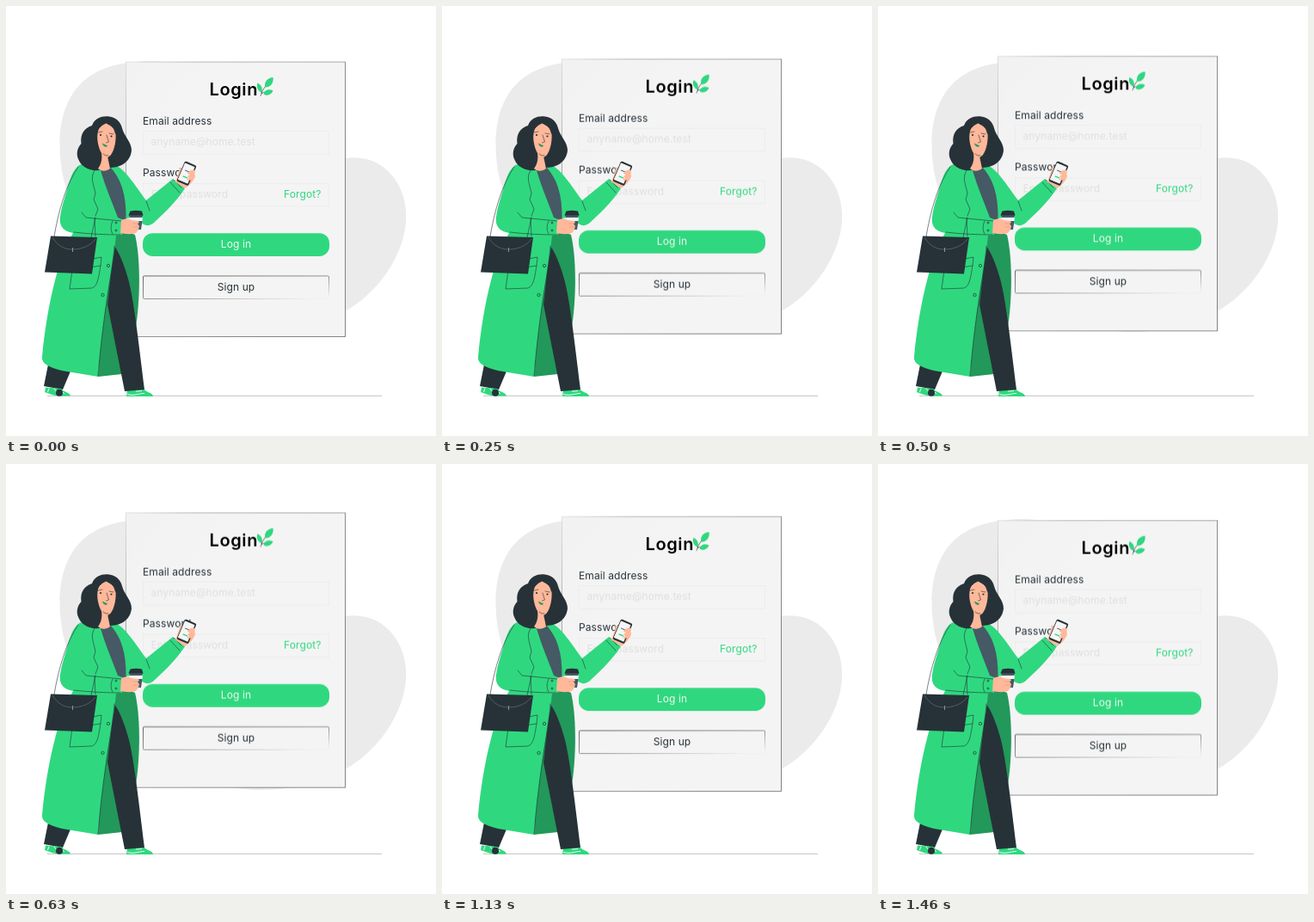
An HTML page that plays this animation: 500x500 px, repeating every 1500 ms.

```html
<!DOCTYPE html>
<html lang="en">
<head>
<meta charset="utf-8">
<title>Login</title>
<style>
  html, body { margin: 0; width: 100%; height: 100%; overflow: hidden; background: #fff; }
  svg { display: block; width: 100%; height: 100%; }
  text { font: 12px Inter, sans-serif; letter-spacing: .1px; fill: #263238; }
  .title { font-size: 20px; font-weight: 600; letter-spacing: .6px; fill: #000; }
  .hint { fill: #e0e0e0; }
  .mid { text-anchor: middle; }
  .green { fill: #2fd87f; }
  .shade { fill: #22985a; }
  .dark { fill: #263238; }
  .slate { fill: #455a64; }
  .skin { fill: #ffb89a; }
  .light { fill: #f5f5f5; }
  .field { fill: none; stroke: #ebebeb; stroke-width: .8; }
  .line { fill: none; stroke: #263238; stroke-width: .6; stroke-linecap: round; stroke-linejoin: round; }
  .panel { animation: float 1.5s steps(18, start) -5ms infinite; }
  @keyframes float {
    50% { transform: translateY(-10px); }
  }
</style>
</head>
<body>
<svg viewBox="0 0 500 500">
  <defs>
    <linearGradient id="edge" gradientUnits="userSpaceOnUse" x1="139" y1="65" x2="395" y2="200">
      <stop offset="0" stop-color="#ddd"/>
      <stop offset=".25" stop-color="#999"/>
      <stop offset="1" stop-color="#777"/>
    </linearGradient>
    <linearGradient id="sheet" x1="0" y1="0" x2="1" y2="1">
      <stop offset="0" stop-color="#f2f2f2"/>
      <stop offset=".3" stop-color="#f4f4f4"/>
    </linearGradient>
    <linearGradient id="outline" x1="0" y1="0" x2="1" y2="1">
      <stop offset="0" stop-color="#444"/>
      <stop offset=".5" stop-color="#777"/>
      <stop offset=".95" stop-color="#f0f0f0"/>
    </linearGradient>
  </defs>

  <!-- backdrop -->
  <path fill="#ebebeb" d="M62.500 160C63 112 84 71 147 65.500C200 58 250 80 290 120C330 165 360 182 400 176.500C440 173.500 466 208 465.300 246C464 290 432 334 395 354.500C362 373 325 380 288 379C230 376 170 345 130 305C92 270 62 220 62.500 160Z"/>
  <path d="M48 453.300H437" stroke="#b0b0b0" stroke-width=".8"/>

  <!-- form -->
  <g class="panel">
    <rect x="139.500" y="65.500" width="255" height="319.600" fill="url(#sheet)" stroke="url(#edge)" stroke-width=".9"/>
    <text class="title" x="236.500" y="105">Login</text>
    <path class="line" d="M296 105Q297 100 302 93M297.500 102L301 100.500M297.500 102L296 95"/>
    <path class="green" d="M301.500 95C299.500 88 305 84 310.500 83.500C311.500 89 308.500 95 301.500 95ZM299.500 103C301 97.500 306 96.500 310.500 99C308.500 104 303.500 105.500 299.500 103ZM297 101C292 98.500 291 94 292.500 90C297.500 92.500 299 97 297 101Z"/>

    <text x="159" y="138.300">Email address</text>
    <rect class="field" x="159.500" y="146.200" width="216" height="26.500"/>
    <text class="hint" x="168.500" y="162.500">anyname@home.test</text>

    <text x="159" y="199">Password</text>
    <rect class="field" x="159.500" y="207" width="216" height="26.500"/>
    <text class="hint" x="168.500" y="223.500">Enter password</text>
    <text class="green" x="323" y="223.500">Forgot?</text>

    <rect class="green" x="159" y="264.800" width="217" height="26.700" rx="11.500"/>
    <text class="mid" x="267.500" y="282" style="fill:#f5f5f5">Log in</text>
    <rect x="159.500" y="314.500" width="216" height="26.600" rx="1" fill="none" stroke="url(#outline)" stroke-width=".8"/>
    <text class="mid" x="267.500" y="331.500">Sign up</text>
  </g>

  <!-- legs and shoes -->
  <path class="dark" d="M50 412L44 442L66 446L77 420Z"/>
  <path class="green" d="M46 443.500L45 449C51 451 56 453.500 62 453.500H75C74 449 67 449 64 445Z"/>
  <path fill="none" stroke="#fff" stroke-width=".9" d="M50 444.500L48.500 449M56 445L60 450M64 447L68 451"/>
  <circle class="dark" cx="62" cy="449.800" r="4"/>
  <path class="green" d="M141 446.500L140 454H171C171 450 164 449.500 160 445.500Z"/>
  <path fill="none" stroke="#fff" stroke-width=".9" d="M141 451.500C150 454 155 450 161 450.500M151 448L158 447.500"/>

  <!-- coat lining and trousers -->
  <path class="shade" d="M121 255L150 266C156 290 157 340 150 379L135 428L107 431L112 340Z"/>
  <path class="dark" d="M126 279C132 287 139 305 143 321C149 345 154 390 161 446L138 448L118 347Z"/>

  <!-- shirt and neck -->
  <path class="slate" d="M105 190L122 187C133 195 138 210 140 226V250H112Z"/>

  <!-- raised arm -->
  <path class="green" d="M120 184C134 183 144 200 163 226L194 201L208 212C199 226 187 238 174 250C167 258 159 257 152 245L139.500 247C140 220 134 200 120 186Z"/>
  <path class="line" d="M163 227L167 238M191 205L202 217M195 202L204 211"/>

  <!-- coat front -->
  <path class="green" d="M95 184L86 184.500C77 190 74 203 70 217C66 230 62 243 63 252C65 260 70 262 78 264C62 290 48 345 42 408C41 416 50 420 65 424L107 431C110 390 116 345 126 285L128 267L135 266V248L130 246C125 232 116 212 109 188Z"/>
  <path class="line" d="M103 191C98 200 101 204 104 218L102 225L107 236L104 244M88 240L93 246L134 250M79 263C95 265 115 266 133 266M124 250C121 256 122 262 124 265M126 279C124 310 114 347 107 430M103 247L104 268"/>
  <path class="line" d="M78 298L111 292L110 302L77 307M77 307L74 329L100 328C107 326 108 313 110 302"/>
  <g fill="none" stroke="#263238" stroke-width=".7">
    <circle cx="119" cy="302" r="1.700"/>
    <circle cx="112.500" cy="336" r="1.700"/>
    <circle cx="128" cy="252" r="1"/>
    <circle cx="128" cy="261" r="1"/>
  </g>

  <!-- bag -->
  <path class="line" d="M56 268C61 238 70 207 84 187M99 269L104 246"/>
  <path class="dark" d="M52 267.500L106 269L100 311.500L45 309.500Z"/>
  <path fill="none" stroke="#71797d" stroke-width=".6" d="M54 269C60 279 68 283 77 283C88 283 98 279 104 271"/>
  <path fill="none" stroke="#8b9397" stroke-width="1" d="M77.500 281V286"/>

  <!-- head -->
  <path class="dark" d="M100 139C103 131 110 128 118 128.300C127 129 133 134 135 142C137 151 146 158 146 168C145 177 140 183 132 186C124 189 118 187 112 190C101 194 88 188 84.500 179C81 172 83 165 87.500 160C86 149 91 142 100 139Z"/>
  <path class="skin" d="M107 146C108 141 112 138 116 136C120 139 125 140 127 145C129 155 126 168 122 173C121 175 118 175 118.500 177L121 189C116 193 110 192 107 189C111 184 112 177 111 171C107 164 105 153 107 146Z"/>
  <path class="dark" d="M105 150C106 142 111 139 117 136L112 133L102 140ZM116 136C122 138 126 142 127 149L131 144L124 134Z"/>
  <path class="line" d="M117 150L119.500 158L116.500 159M107.500 147L112 146M120 148L125 149M113 172Q116 175 119 174"/>
  <circle class="dark" cx="110" cy="150" r="1.100"/>
  <circle class="dark" cx="122.500" cy="151.500" r="1.100"/>
  <path class="shade" d="M112 159.500L118 162.500C117 165 113 164 112 159.500Z"/>

  <!-- cup -->
  <path class="light" d="M144 246H159L157 260H146Z"/>
  <path class="slate" d="M143 243H159L158 246H144ZM145 250H158.500L157 260H146Z"/>
  <path class="dark" d="M144.500 238.500Q151 237 158 238.500L159.500 243.500H142.500Z"/>
  <path class="skin" d="M134 249C138 247 143 247 146 249L154 250Q156 252 153 253L155 256L154 260L151 264C145 266 138 265 133 264Z"/>
  <path fill="none" stroke="#d98d70" stroke-width=".5" d="M147 253H153M148 257H154"/>

  <!-- phone -->
  <path class="skin" d="M198 202L202 190Q200 187 203 188L218 191L220 198C218 204 213 209 208 212L196 204Z"/>
  <g transform="translate(210 194.700) rotate(23) scale(.92)">
    <rect class="dark" x="-8" y="-13.800" width="16" height="27.600" rx="2"/>
    <rect class="light" x="-7.200" y="-11.500" width="13.600" height="23" rx=".6"/>
    <path d="M-3.500 -3H3.500" stroke="#455a64" stroke-width="1.100"/>
    <path d="M-3 5H3.500" stroke="#2fd87f" stroke-width="1.600"/>
  </g>
  <path class="skin" d="M220 191C216 189 211 193 211 195L214 196L211 198L213 200L210 202C213 204 217 202 219 198Z"/>
</svg>
</body>
</html>
```
